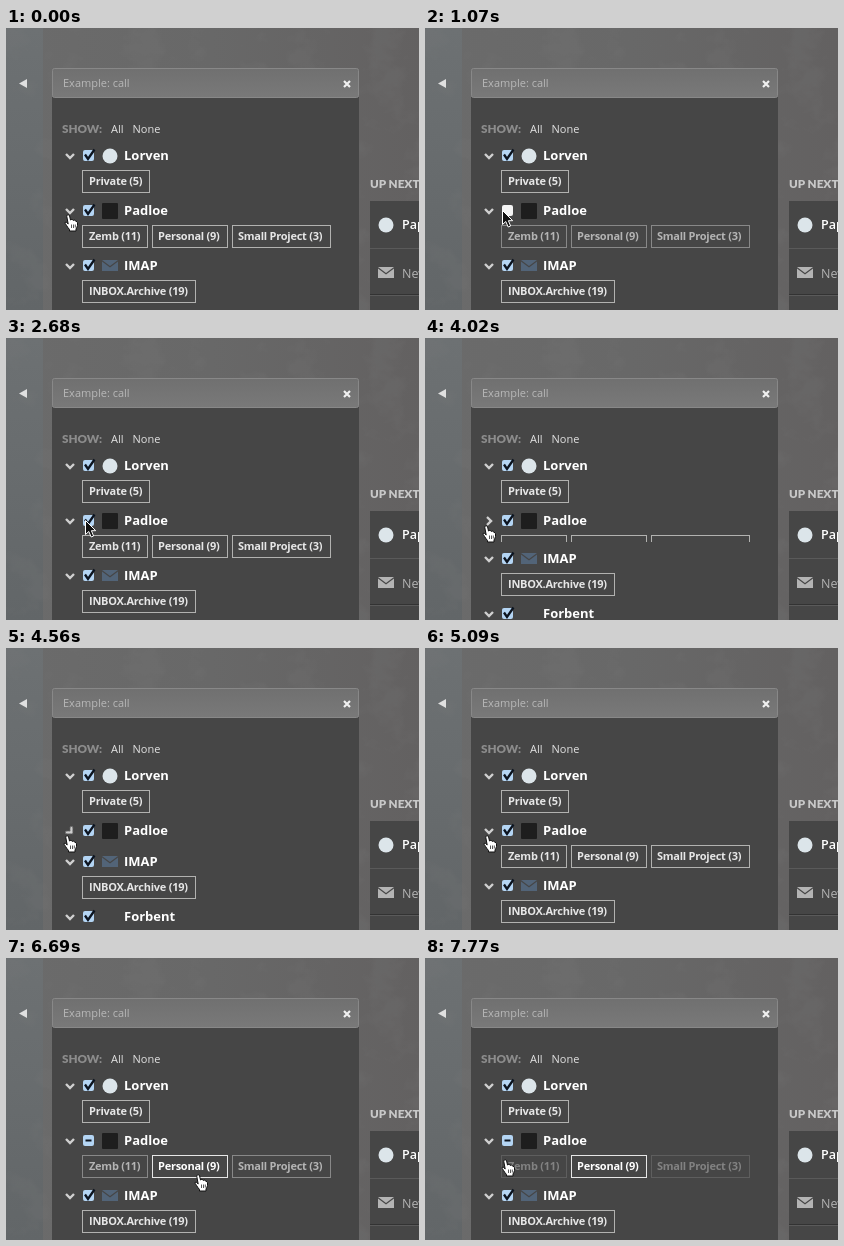
These frames come from a looping animation (413 px wide and 282 px high, 8 s). An HTML page:

```html
<!DOCTYPE html>
<html lang="en">
<head>
<meta charset="utf-8">
<title>Mail filter panel</title>
<style>
html, body { margin: 0; width: 100%; height: 100%; overflow: hidden; background: #646464; }
svg { display: block; width: 413px; height: 282px; }
text { font: 500 11px "Open Sans", sans-serif; fill: #e2e2e2; stroke: none; }
.title { font-size: 13px; font-weight: 700; fill: #fff; }
.head { font-family: Lato, sans-serif; font-size: 11.7px; font-weight: 900; }
.tag { color: #e6e6e6; stroke: #b2b2b0; }
.tag rect { fill: none; }
.tag text { font-weight: 700; letter-spacing: -.25px; fill: currentColor; }
.chev { fill: none; stroke: #d0d0d0; stroke-width: 2.4; }

/* Every change is a hard cut, so all tracks hold their value. */
.anim { animation: 8s step-end infinite; }
.side { animation-name: side; }
.mid { animation-name: mid; }
.hover { animation-name: side, hover; }
.fold { animation-name: fold; }
.below { animation-name: below; }
.turn { animation-name: turn; }
.box { animation-name: box; }
.tick { animation-name: tick; }
.dash { animation-name: dash; opacity: 0; }
.cursor { animation-name: cursor; }
.hand { animation-name: hand; }
.arrow { animation-name: arrow; }

@keyframes side {
  0%, 33.5% { color: #e6e6e6; stroke: #b2b2b0; }
  13.375%, 30.125%, 83.625% { color: #b4b4b4; stroke: #888; }
  16.75%, 87%, 100% { color: #828282; stroke: #5e5e5e; }
}
@keyframes mid {
  0%, 33.5%, 73.75% { color: #e6e6e6; stroke: #b2b2b0; }
  13.375%, 30.125% { color: #b4b4b4; stroke: #888; }
  16.75% { color: #828282; stroke: #5e5e5e; }
  70.375%, 77%, 100% { color: #fff; stroke: #e6e6e6; }
}
@keyframes hover {
  67% { color: #fff; stroke: #e6e6e6; }
  0%, 33.5%, 70.375% { color: #e6e6e6; stroke: #b2b2b0; }
  13.375%, 30.125%, 83.625% { color: #b4b4b4; stroke: #888; }
  16.75%, 87%, 100% { color: #828282; stroke: #5e5e5e; }
}
@keyframes fold {
  0%, 63.625%, 100% { height: 24px; }
  50.25% { height: 7px; }
  53.625% { height: 0; }
  60.25% { height: 12px; }
}
@keyframes below {
  0%, 63.625%, 100% { transform: none; }
  50.25% { transform: translateY(-17px); }
  53.625% { transform: translateY(-24px); }
  60.25% { transform: translateY(-12px); }
}
@keyframes turn {
  0%, 60.25%, 100% { transform: rotate(0deg); }
  46.875%, 57% { transform: rotate(-45deg); }
  50.25% { transform: rotate(-90deg); }
}
@keyframes box {
  0%, 30.125%, 100% { fill: #b4d5f4; }
  13.375% { fill: #f4f4f4; }
}
@keyframes tick {
  0%, 30.125% { opacity: 1; }
  13.375%, 83.625%, 100% { opacity: 0; }
}
@keyframes dash {
  0% { opacity: 0; }
  83.625%, 100% { opacity: 1; }
}
@keyframes cursor {
  0% { transform: translate(58px, 186px); }
  3.375% { transform: translate(70px, 184px); }
  6.625% { transform: translate(76px, 180px); }
  13.375% { transform: translate(77px, 182px); }
  20.125% { transform: translate(79px, 182px); }
  43.5% { transform: translate(57px, 187px); }
  63.625% { transform: translate(58px, 187px); }
  67% { transform: translate(152px, 209px); }
  70.375% { transform: translate(214px, 209px); }
  73.75% { transform: translate(205px, 222px); }
  77% { transform: translate(186px, 214px); }
  80.375% { transform: translate(188px, 216px); }
  97.125%, 100% { transform: translate(76px, 201px); }
}
@keyframes hand {
  0%, 43.5%, 77%, 100% { opacity: 1; }
  6.625%, 73.75% { opacity: 0; }
}
@keyframes arrow {
  0%, 43.5%, 77%, 100% { opacity: 0; }
  6.625%, 73.75% { opacity: 1; }
}
</style>
</head>
<body>
<svg viewBox="0 0 413 282">
  <defs>
    <linearGradient id="wall">
      <stop offset="0" stop-color="#6b6b6b"/>
      <stop offset=".5" stop-color="#686868"/>
      <stop offset="1" stop-color="#636161"/>
    </linearGradient>
    <linearGradient id="strip" x2="0" y2="1">
      <stop offset="0" stop-color="#6d7173"/>
      <stop offset="1" stop-color="#626668"/>
    </linearGradient>
    <linearGradient id="field" x2="0" y2="1">
      <stop offset="0" stop-color="#707070"/>
      <stop offset="1" stop-color="#797979"/>
    </linearGradient>
    <filter id="grunge" x="0" y="0" width="1" height="1">
      <feTurbulence type="fractalNoise" baseFrequency=".025 .03" numOctaves="5" seed="4"/>
      <feColorMatrix values="0 0 0 0 .2  0 0 0 0 .2  0 0 0 0 .2  5 0 0 0 -2.5"/>
    </filter>
    <clipPath id="drawer"><rect class="anim fold" x="70" y="14" width="270" height="24"/></clipPath>
    <path id="chev" class="chev" d="M-4-2 0 2 4-2"/>
    <rect id="square" x="77" y="-6" width="11" height="11" rx="2"/>
    <path id="tick" d="M79-1.500 82 3 88.500-6.500" fill="none" stroke="#0c1420" stroke-width="2.300"/>
    <g id="controls">
      <use href="#chev" x="64"/>
      <use href="#square" fill="#b4d5f4"/>
      <use href="#tick"/>
    </g>
    <path id="mail" d="M0 0H16L8 6ZM0 1.500 8 7.500 16 1.500V11H0Z"/>
  </defs>

  <rect width="413" height="282" fill="url(#wall)"/>
  <rect width="37" height="282" fill="url(#strip)"/>
  <rect width="413" height="282" filter="url(#grunge)" opacity=".16"/>
  <path d="M21 51v9l-8-4.500z" fill="#e0e0e0"/>

  <rect x="46" y="69" width="307" height="213" fill="#464646"/>
  <rect x="46.500" y="40.500" width="306" height="29" rx="2" fill="url(#field)" stroke="#888"/>
  <text x="57" y="59" style="fill:#b8b8b8">Example: call</text>
  <path d="M338 53l6 6m0-6l-6 6" stroke="#f0f0f0" stroke-width="2.200"/>

  <text class="head" x="56" y="105" style="fill:#8c8c8c">SHOW:</text>
  <text x="105" y="105">All</text>
  <text x="126.500" y="105">None</text>

  <g transform="translate(0 128)">
    <use href="#controls"/>
    <circle cx="104" r="7.500" fill="#dce5ea"/>
    <text class="title" x="118" y="4">Lorven</text>
    <g class="tag"><rect x="76.500" y="14.500" width="67" height="22"/><text x="83" y="29">Private (5)</text></g>
  </g>

  <g transform="translate(0 183)">
    <g transform="translate(64 0)"><g class="anim turn"><use href="#chev"/></g></g>
    <use href="#square" class="anim box"/>
    <use href="#tick" class="anim tick"/>
    <path class="anim dash" d="M79.500-.5h6" stroke="#0c1420" stroke-width="2"/>
    <rect x="96" y="-8" width="16" height="16" rx="1" fill="#1e1e1e"/>
    <text class="title" x="118" y="4">Padloe</text>
    <g clip-path="url(#drawer)">
      <g class="tag anim hover"><rect x="76.500" y="14.500" width="65" height="22"/><text x="83" y="29">Zemb (11)</text></g>
      <g class="tag anim mid"><rect x="146.500" y="14.500" width="75" height="22"/><text x="152" y="29">Personal (9)</text></g>
      <g class="tag anim side"><rect x="226.500" y="14.500" width="98" height="22"/><text x="232" y="29">Small Project (3)</text></g>
    </g>
  </g>

  <g class="anim below">
    <g transform="translate(0 238)">
      <use href="#controls"/>
      <use href="#mail" x="96" y="-6" fill="#526478"/>
      <text class="title" x="118" y="4">IMAP</text>
      <g class="tag"><rect x="76.500" y="14.500" width="113" height="22"/><text x="83" y="29">INBOX.Archive (19)</text></g>
    </g>
    <g transform="translate(0 293)">
      <use href="#controls"/>
      <text class="title" x="118" y="4">Forbent</text>
    </g>
  </g>

  <text class="head" x="364" y="160" style="fill:#c8c8c8">UP NEXT</text>
  <rect x="364" y="173" width="49" height="109" fill="#464646"/>
  <path d="M364 220.500h49M364 267.500h49" stroke="#5a5a5a"/>
  <path d="M364 266.500h49" stroke="#333"/>
  <circle cx="380" cy="197" r="7.500" fill="#dce5ea"/>
  <text x="396" y="201" style="font-size:12.500px;font-weight:600;fill:#fff">Paper</text>
  <use href="#mail" x="372" y="239" fill="#b4b4b4"/>
  <text x="396" y="250" style="font-size:12.500px;fill:#b4b4b4">New</text>

  <g class="anim cursor" stroke-linejoin="round">
    <g class="anim hand" fill="#fff" stroke="#111">
      <path d="M4 9 2.800 2.500Q2.700.8 4 .6 5.200.6 5.600 2L6.500 6Q7 5.300 8 5.400 9 5.500 9.300 6.500 10 5.900 10.900 6.200 11.700 6.500 11.900 7.400 13.400 7 13.500 8.800V11.500Q13.200 13 12 15V17H5.500V15.500Q3.500 13.200 2.600 11.500.5 9 1.200 8.300 2.400 7.600 4.200 10Z"/>
      <path d="M7.500 10.500v3.500M9.500 10.500v3.500M11.300 10.500v3" stroke-width=".7"/>
    </g>
    <path class="anim arrow" fill="#111" stroke="#fff" d="M.5.5V14.500L3.800 11.500 6.200 17 8.600 16 6.400 10.700H10.700Z"/>
  </g>
</svg>
</body>
</html>
```
